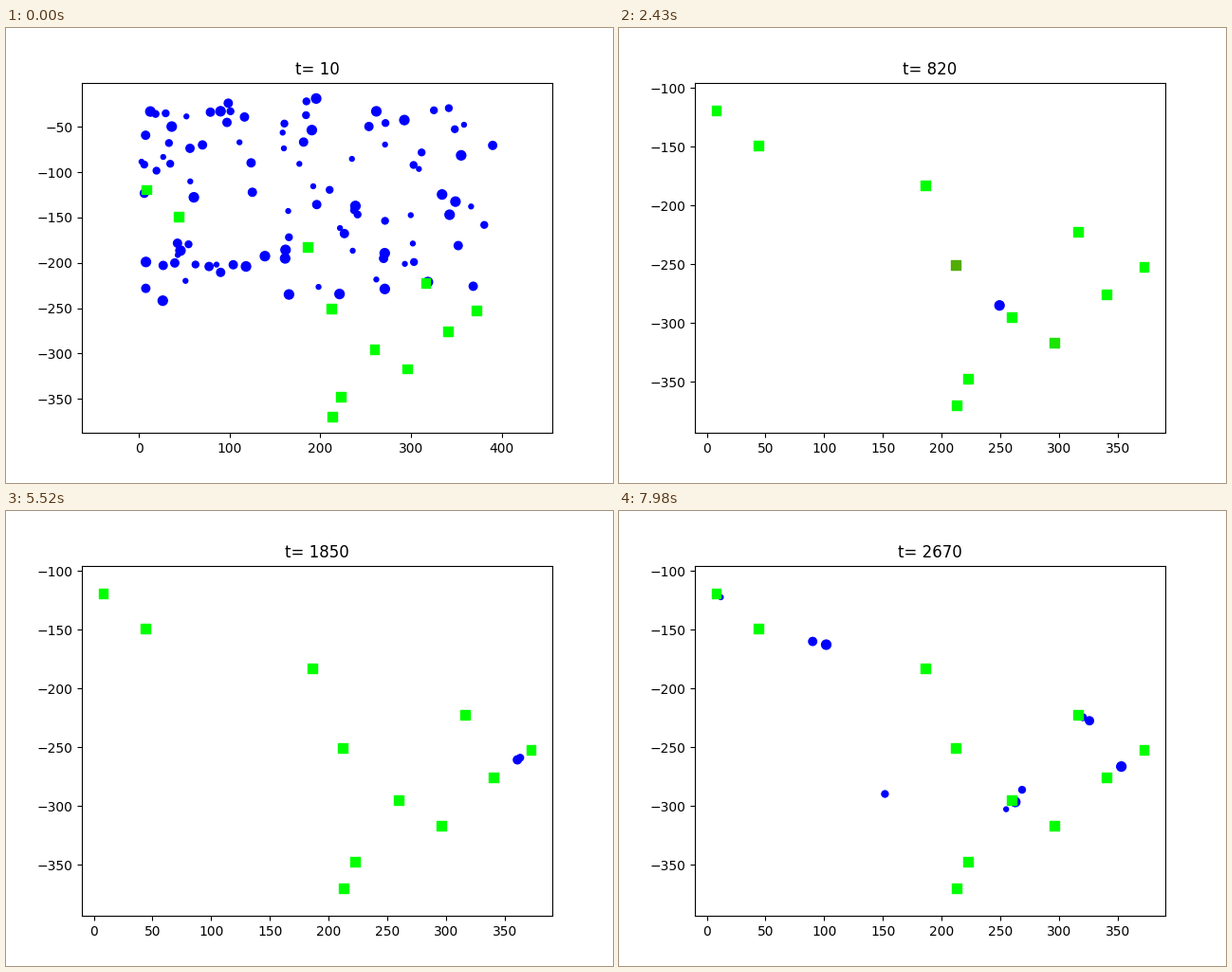
Recreate the animation shown at these times as a matplotlib script. Size 640 by 480 pixels, loop 8000 ms.

```python
import numpy as np
import matplotlib.pyplot as plt
from matplotlib.animation import FuncAnimation

FRAMES, INTERVAL = 320, 25

STATIONS = np.array([
    (8.1, -119.2), (44.2, -149.1), (186.2, -182.9), (212.1, -250.7),
    (316.1, -222.4), (372, -252.3), (340.4, -275.7), (259.7, -295),
    (296, -316.8), (222.6, -347.5), (212.8, -370)])

# Four walker classes, 0 to 3: the bigger, the slower
CLASSES = np.arange(4)
SIZES = 12.5 * (CLASSES + 1)
SPEEDS = 15.5 - 1.5 * CLASSES

walks = []  # x0, y0, x1, y1, departure step, class


def enter(points):
    """Each newcomer heads for the nearest station."""
    for i, p in enumerate(points):
        gaps = np.hypot(*(STATIONS - p).T)
        walks.append((*p, *STATIONS[gaps.argmin()], 0, i % 4))


def send(a, b, first, batches, every=0):
    """Batches leave a for b at a fixed rhythm; each digit is one walker."""
    for i, batch in enumerate(batches.split()):
        for k in batch:
            walks.append((*STATIONS[a - 1], *STATIONS[b - 1],
                          first + i * every, int(k)))


rng = np.random.default_rng(12)
crowd = rng.uniform((5, -244), (388, -21), (97, 2))
enter(np.vstack([(3, -88.5), crowd, (390, -70.5), (195.5, -18.8)]))

send(1, 2, 16.3, "320 210 32", every=4)
send(1, 3, 42.9, "210 32", every=4)
send(2, 3, 46.8, "32 20", every=12)
send(4, 8, 21.8, "20 31 3 " * 4, every=7.8)
send(7, 6, 28.6, "3 21 310 0 " * 6, every=11.8)
send(8, 9, 64, "3 " * 11, every=20.17)
send(9, 10, 118, "21 310", every=8)
send(10, 11, 140, "31 " * 3, every=8.2)
send(3, 5, 155.6, "0")
send(3, 2, 164, "32 " * 3, every=47.05)
send(2, 1, 192, "310 2 0", every=35.65)
send(4, 11, 208.1, "2")
send(5, 11, 208.8, "31")
send(5, 10, 226, "20 1", every=34.3)
send(11, 2, 258.8, "1")
send(6, 5, 261.8, "21")
send(8, 11, 265.4, "0")

walks = np.array(walks)
start, end, depart = walks[:, :2], walks[:, 2:4], walks[:, 4]
kind = walks[:, 5].astype(int)
duration = np.hypot(*(end - start).T) / SPEEDS[kind]


def walkers(step):
    part = (step - depart) / duration
    out = (part >= 0) & (part < 1)
    pos = start[out] + (end - start)[out] * part[out, None]
    return pos, SIZES[kind[out]]


def queue(step, first, last, peak):
    """Load that swells and fades, updated every fourth step."""
    part = np.clip((step // 4 * 4 - first) / (last - first), 0, 1)
    return peak * np.sin(np.pi * part)


def station_colors(step):
    load = np.zeros(len(STATIONS))
    load[3] = queue(step, 20, 140, 0.32)
    load[8] = queue(step, 60, 140, 0.15)
    return np.column_stack([load, 1 - load, 0 * load])


fig, ax = plt.subplots(figsize=(6.4, 4.8), dpi=100)
dots = ax.scatter([], [], color="blue")
squares = ax.scatter(*STATIONS.T, s=50, marker="s", color="lime")
title = ax.set_title("")
box = np.array([496, 369.6])


def fit_view(points):
    """Equal scale on both axes with the usual 5 % margin."""
    lo, hi = points.min(axis=0), points.max(axis=0)
    half = box * ((hi - lo) * 1.1 / box).max() / 2
    mid = (lo + hi) / 2
    ax.set_xlim(mid[0] - half[0], mid[0] + half[0])
    ax.set_ylim(mid[1] - half[1], mid[1] + half[1])


def draw(i):
    step = -(-i * 5 // 6)  # one step every 30 ms
    pos, sizes = walkers(step)
    dots.set_offsets(pos)
    dots.set_sizes(sizes)
    squares.set_color(station_colors(step))
    title.set_text(f"t= {10 + 10 * step}")
    fit_view(np.vstack([STATIONS, pos]))
    return dots, squares, title


def init():
    return draw(0)


anim = FuncAnimation(fig, draw, frames=FRAMES, init_func=init,
                     interval=INTERVAL, repeat=True, repeat_delay=0)
plt.show()
```
